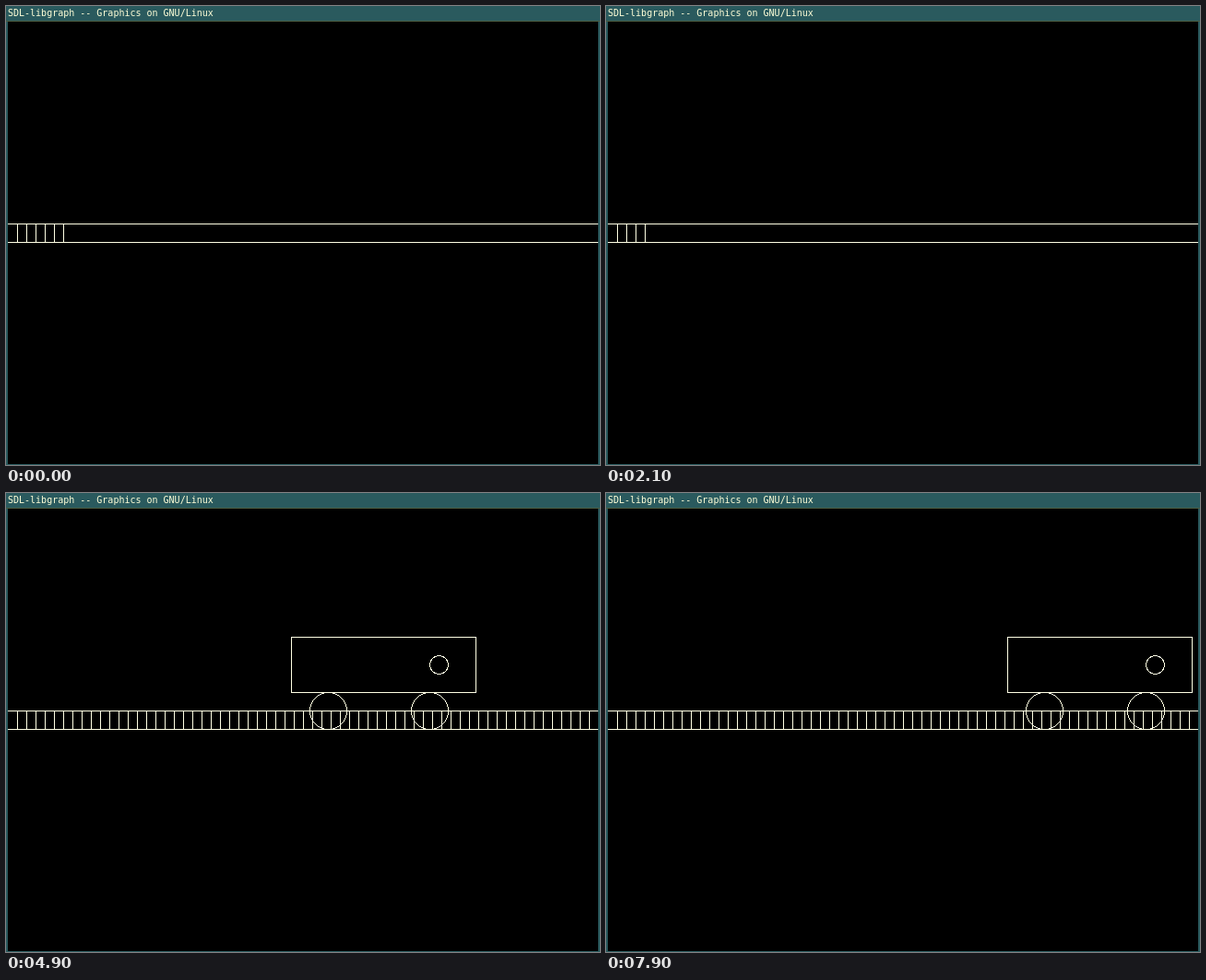
Write an HTML page that moves like this. It is 644 px wide and 498 px high and loops after 8000 ms.

```html
<!DOCTYPE html>
<html lang="en">
<head>
<meta charset="utf-8">
<title>Railway wagon</title>
<style>
  html, body { margin: 0; width: 100%; height: 100%; overflow: hidden; background: #000; }
  svg { display: block; width: 644px; height: 498px; }
  text { font: 10px "DejaVu Sans Mono", monospace; fill: #ffffd8; white-space: pre; }
  .ink { fill: none; stroke: #ffffe4; stroke-width: 1; shape-rendering: crispEdges; }
</style>
</head>
<body>
<svg viewBox="0 0 644 498">
  <rect width="644" height="498" fill="#2a5a5e"/>
  <rect y="16" width="644" height="1" fill="#4c5c40"/>
  <rect x="2" y="17" width="640" height="480" fill="#000"/>
  <text x="2" y="11">SDL-libgraph -- Graphics on GNU/Linux</text>
  <g class="ink">
    <path d="M2 236.5H642M2 256.5H642"/>
    <path id="sleepers"/>
    <g id="wagon">
      <rect x=".5" y="156.5" width="200" height="60"/>
      <circle cx="160.5" cy="186.5" r="10"/>
      <circle cx="40.5" cy="236.5" r="20"/>
      <circle cx="150.5" cy="236.5" r="20"/>
    </g>
  </g>
</svg>
<script>
  const LOOP = 8000, TICK = 100;
  const STEP = 3;              // wagon advance per redraw cycle, px
  const SLEEPERS = 63;
  const DRAW_SHARE = 0.6;      // part of a cycle spent laying sleepers
  const RATE = SLEEPERS / DRAW_SHARE;

  // Redraw cycles completed at a given time (ms); the drawing speed drifts.
  const pace = [
    [0, -19 + 6 / RATE],
    [1300, 0.8],
    [3000, 26.8],
    [4100, 42 + 40 / RATE],
    [5600, 63 + 50 / RATE],
    [6600, 77 + 46 / RATE],
    [7900, 95.8]
  ];

  const sleepers = document.getElementById("sleepers");
  const wagon = document.getElementById("wagon");

  function cyclesAt(t) {
    let i = 1;
    while (i < pace.length - 1 && t > pace[i][0]) i++;
    const [t0, c0] = pace[i - 1], [t1, c1] = pace[i];
    return c0 + (c1 - c0) * (t - t0) / (t1 - t0);
  }

  function render(time) {
    const t = Math.floor(time % LOOP / TICK) * TICK;
    const cycles = cyclesAt(t);
    const cycle = Math.floor(cycles);
    const phase = cycles - cycle;
    const count = Math.min(SLEEPERS, Math.round(phase * RATE));

    let d = "";
    for (let i = 1; i <= count; i++) d += `M${10 * i + 2.5} 237V256`;
    sleepers.setAttribute("d", d);
    wagon.setAttribute("transform", `translate(${150 + STEP * cycle})`);
    wagon.setAttribute("visibility", phase >= DRAW_SHARE ? "visible" : "hidden");
  }

  const start = performance.now();
  function loop() {
    render(performance.now() - start);
    requestAnimationFrame(loop);
  }
  loop();
</script>
</body>
</html>
```
